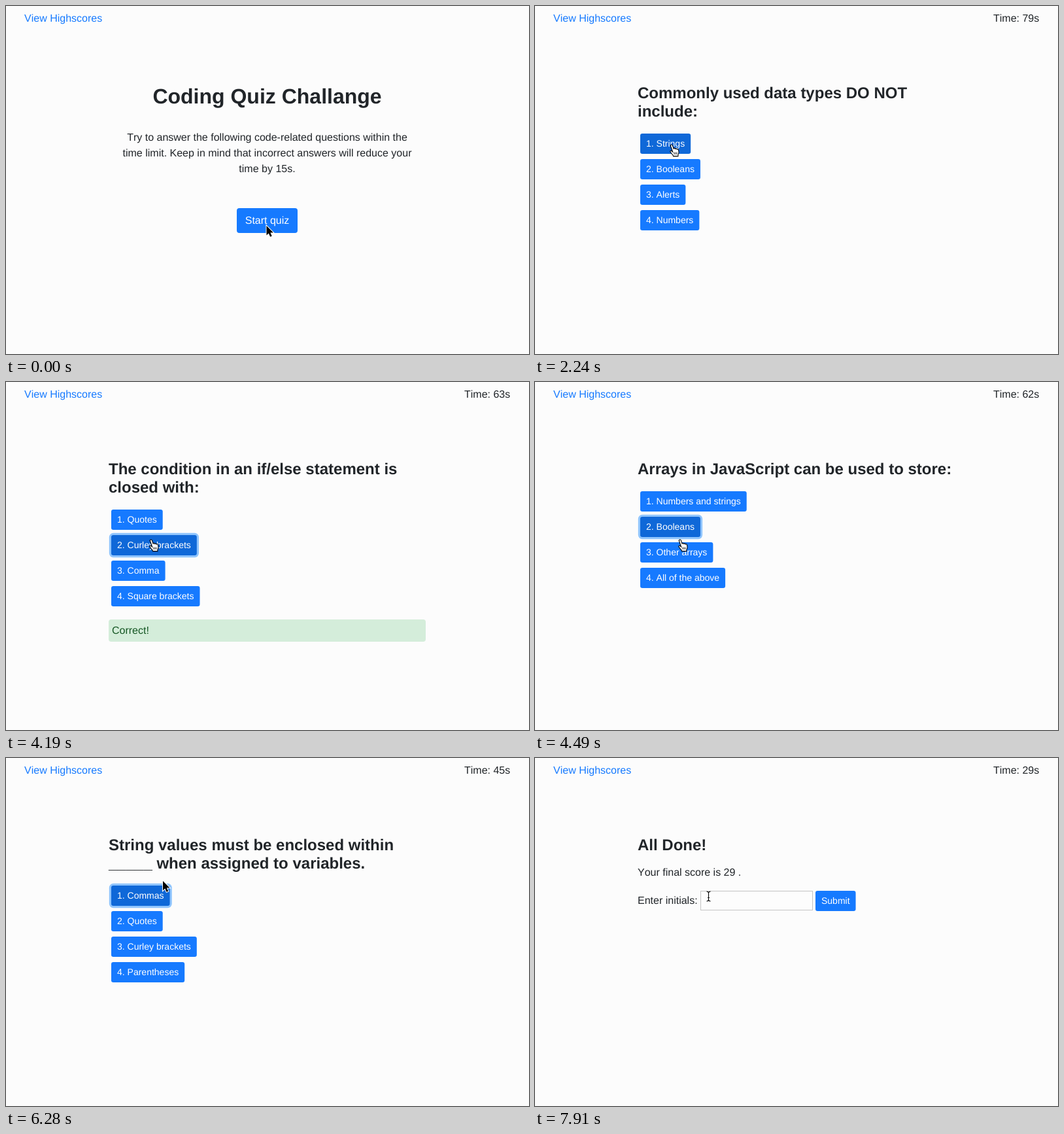
An HTML page for the animation above (8 s loop, 800 by 532 pixels).

```html
<!DOCTYPE html>
<html lang="en">
<head>
<meta charset="utf-8">
<title>Coding quiz</title>
<style>
  html, body { margin: 0; width: 100%; height: 100%; overflow: hidden; background: #fcfcfc; }
  svg { display: block; width: 800px; height: 532px; }
  text {
    font: 16px "Liberation Sans", Arial, sans-serif;
    font-kerning: none;
    text-rendering: geometricPrecision;
    fill: #212529;
    white-space: pre;
  }
  .h1 { font-size: 32px; font-weight: bold; }
  .h2 { font-size: 24px; font-weight: bold; }
  .mid { text-anchor: middle; }
  .link { fill: #167aff; }
  .label { fill: #fff; }
  .small { font-size: 14px; }
  .wrong { fill: #5f151d; }
  .correct { fill: #155724; }
</style>
</head>
<body>
<svg id="stage" viewBox="0 0 800 532" xmlns="http://www.w3.org/2000/svg"></svg>
<script>
const LOOP = 8000;
const LEFT = 157;
const BLUE = '#167aff', DARK_BLUE = '#0f68d8';
const stage = document.getElementById('stage');
const pen = document.createElement('canvas').getContext('2d');
pen.fontKerning = 'none';

const questions = [
  { title: ['Commonly used data types DO NOT', 'include:'],
    answers: ['Strings', 'Booleans', 'Alerts', 'Numbers'] },
  { title: ['The condition in an if/else statement is', 'closed with:'],
    answers: ['Quotes', 'Curley brackets', 'Comma', 'Square brackets'] },
  { title: ['Arrays in JavaScript can be used to store:'],
    answers: ['Numbers and strings', 'Booleans', 'Other arrays', 'All of the above'] },
  { title: ['String values must be enclosed within', '_____ when assigned to variables.'],
    answers: ['Commas', 'Quotes', 'Curley brackets', 'Parentheses'] }
];

// Each entry lists only what changes at that moment; rings maps answer index to ring strength.
const steps = [
  [0, { screen: 'intro', cursor: 'arrow', x: 398.5, y: 336, rings: {} }],
  [1200, { screen: 0, time: 80 }],
  [1790, { x: 352, y: 302 }],
  [1940, { x: 258, y: 228 }],
  [2090, { cursor: 'hand', x: 211, y: 212, hover: 0 }],
  [2240, { x: 209, y: 212, time: 79 }],
  [2690, { alert: 'Wrong!', rings: { 0: 1 }, time: 64 }],
  [2990, { screen: 1, alert: '' }],
  [3290, { time: 63 }],
  [3590, { x: 219, y: 236, hover: 1 }],
  [3740, { x: 222, y: 241 }],
  [4190, { alert: 'Correct!', rings: { 1: 1 } }],
  [4340, { time: 62 }],
  [4490, { screen: 2, alert: '' }],
  [4930, { x: 227, y: 226 }],
  [5080, { x: 238, y: 192, hover: 0 }],
  [5230, { x: 240, y: 188, time: 61 }],
  [5680, { alert: 'Wrong!', rings: { 0: .25, 1: .55 }, time: 46 }],
  [5830, { rings: { 0: 1 } }],
  [5980, { screen: 3, alert: '' }],
  [6280, { cursor: 'arrow', time: 45 }],
  [6570, { cursor: 'hand', x: 216, y: 212 }],
  [6720, { x: 212, y: 215 }],
  [7170, { alert: 'Wrong!', time: 29 }],
  [7470, { screen: 'done', alert: '', cursor: 'beam', x: 212.5, y: 215 }],
  [7910, { x: 265.5, y: 211.5 }]
];

let last = {};
const states = steps.map(([at, change]) => (last = { ...last, ...change, at }));

const cursors = {
  arrow: `<path d="M0 0V14.6L3.3 11.5 5.6 16.8 8.2 15.7 5.9 10.5H10.4Z"
    stroke="#fff" stroke-width="2" paint-order="stroke"/>`,
  hand: `<path d="M-1.8 1.2C-1-.4 1-.2 1.4 1.2L3 6c.3-.9 2.4-.9 2.7.4 .5-.8 2.2-.6 2.5.6
    .6-.6 2-.3 2.2.9 .5 1.7.8 3.5.4 5.2l-.9 2.3v2.2h-7.4l-.4-1.4c-1.5-1.5-2.8-3.4-4-5.2
    -.8-1.3.6-2.3 1.9-1.4l1.6 1.4z" fill="#fff" stroke="#000" stroke-width="1.1"/>
    <path d="M4 11.5v3.5M6 11.5v3.5M8 11.5v3.5" stroke="#000" stroke-width=".8"/>`,
  beam: `<path d="M-3-7.5Q-.5-7.5 0-5.5Q.5-7.5 3-7.5M-3 7.5Q-.5 7.5 0 5.5Q.5 7.5 3 7.5
    M0-5.5V5.5M-1.5 2H1.5" fill="none" stroke="#000" stroke-width="1.1"/>`
};

const text = (x, y, str, cls = '') => `<text x="${x}" y="${y}" class="${cls}">${str}</text>`;

const rect = (x, y, w, h, r, fill, extra = '') =>
  `<rect x="${x}" y="${y}" width="${w}" height="${h}" rx="${r}" fill="${fill}" ${extra}/>`;

function button(x, y, label, fill = BLUE, ring = 0) {
  pen.font = '14px "Liberation Sans", Arial, sans-serif';
  const w = pen.measureText(label).width + 18;
  const s = 3.2 * ring;
  const glow = ring
    ? rect(x - s, y - s, w + 2 * s, 31 + 2 * s, 3.2 + s, '#268fff', `fill-opacity="${ring / 2}"`)
    : '';
  return glow + rect(x, y, w, 31, 3.2, fill) + text(x + 9, y + 20, label, 'label small');
}

function intro() {
  const lines = [
    'Try to answer the following code-related questions within the',
    'time limit. Keep in mind that incorrect answers will reduce your',
    'time by 15s.'
  ];
  return text(399.5, 149, 'Coding Quiz Challange', 'h1 mid') +
    lines.map((line, i) => text(399.5, 206 + 24 * i, line, 'mid')).join('') +
    rect(353, 309, 93, 38, 4, BLUE) +
    text(399.5, 333, 'Start quiz', 'label mid');
}

function question({ screen, hover, rings, alert }) {
  const { title, answers } = questions[screen];
  const top = 139 + 28 * title.length;
  let out = title.map((line, i) => text(LEFT, 141 + 28 * i, line, 'h2')).join('');
  answers.forEach((answer, i) => {
    const ring = rings[i] || 0;
    const fill = i === hover || ring === 1 ? DARK_BLUE : BLUE;
    out += button(161, top + 39 * i, `${i + 1}. ${answer}`, fill, ring);
  });
  if (alert) {
    const wrong = alert === 'Wrong!';
    out += rect(LEFT, top + 168, 485, 34, 4, wrong ? '#f8d5d8' : '#d4edda') +
      text(162, top + 190, alert, wrong ? 'wrong' : 'correct');
  }
  return out;
}

function done({ time }) {
  return text(LEFT, 141, 'All Done!', 'h2') +
    text(LEFT, 180, `Your final score is ${time} .`) +
    text(LEFT, 223, 'Enter initials:') +
    rect(253.5, 203.5, 171, 29, 0, '#fdfdfd', 'stroke="#c4c4c4"') +
    button(429, 203, 'Submit');
}

function draw(state) {
  const { screen, time, cursor, x, y } = state;
  const body = screen === 'intro' ? intro() : screen === 'done' ? done(state) : question(state);
  stage.innerHTML = text(28, 24, 'View Highscores', 'link') +
    (time ? text(701, 24, `Time: ${time}s`) : '') + body +
    `<g transform="translate(${x} ${y})">${cursors[cursor]}</g>`;
}

let shown;
function tick() {
  const t = performance.now() % LOOP;
  const state = states.filter(s => s.at <= t).pop();
  if (state !== shown) draw(shown = state);
  requestAnimationFrame(tick);
}
tick();
</script>
</body>
</html>
```
